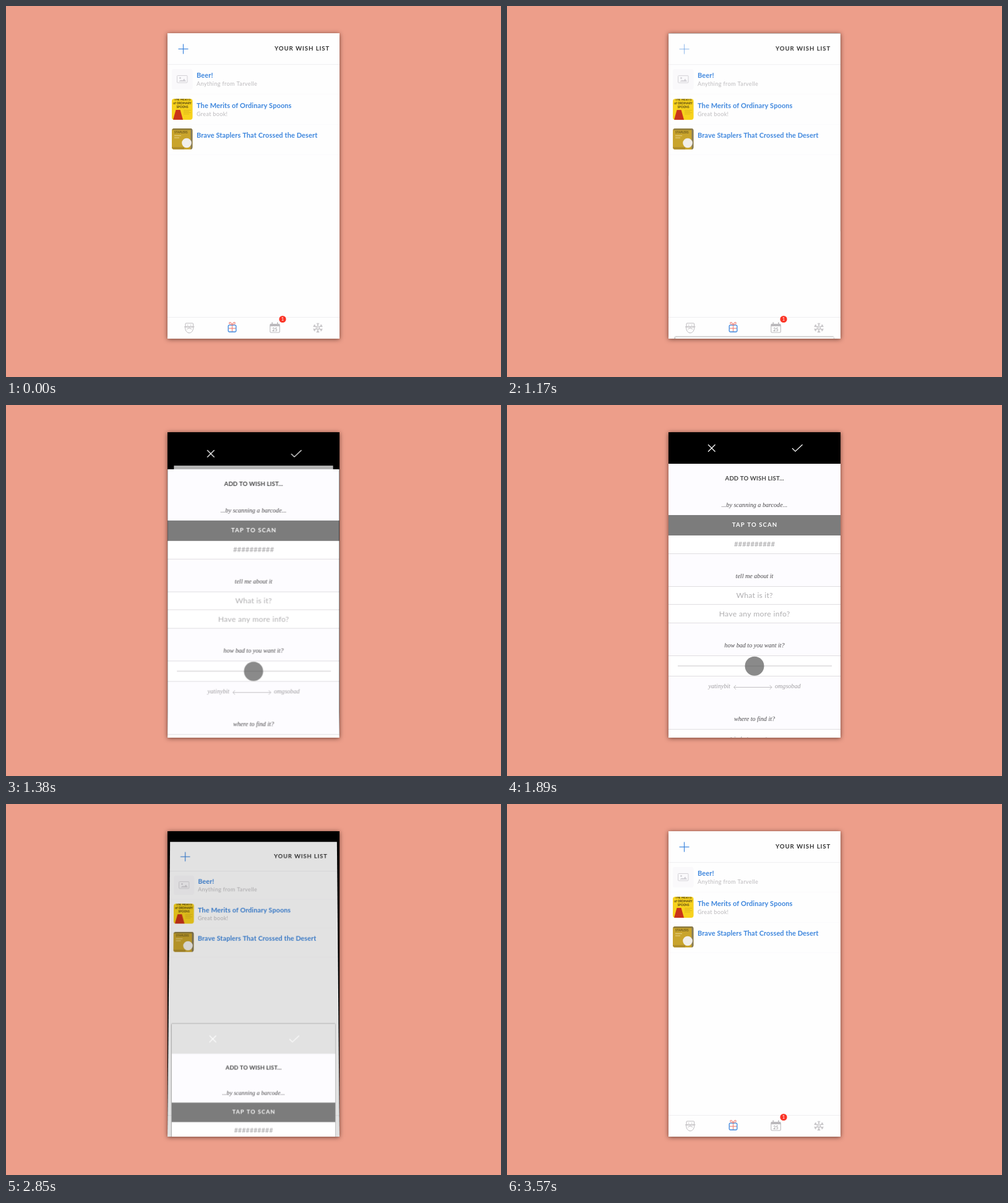
These frames come from a looping animation (800x600 px, 3600 ms). An HTML page with a canvas:

```html
<!DOCTYPE html>
<html lang="en">
<head>
<meta charset="utf-8">
<title>Wish list</title>
<style>
  html, body { margin: 0; width: 800px; height: 600px; overflow: hidden; background: #ed9e8a; }
  #phone {
    position: absolute; left: 261px; top: 44px; width: 278px; height: 494px;
    overflow: hidden; background: #000;
  }
  #shadow {
    position: absolute; left: 261px; top: 44px; width: 278px; height: 494px;
    box-shadow: 0 1px 7px rgba(40, 15, 10, .65);
  }
  canvas { position: absolute; left: 0; top: 0; }
  #list { transform-origin: 50% 100%; }
  #sheet { transform-origin: 50% 0; }
</style>
</head>
<body>
<div id="shadow"></div>
<div id="phone">
  <canvas id="list" width="278" height="494"></canvas>
  <canvas id="sheet" width="278" height="494"></canvas>
</div>
<script>
const LOOP = 3600, TAP = 1140, OPEN = 1167, CLOSE = 2758;
const SANS = 'Lato, sans-serif';
const ITALIC = 'italic 10.1px "Liberation Serif", serif';
const BLUE = '#3d86dd', GREY = '#bcbabd';

const listEl = document.getElementById('list');
const sheetEl = document.getElementById('sheet');
let c;

// Both canvases are drawn in stage coordinates.
function begin(canvas) {
  c = canvas.getContext('2d');
  c.setTransform(1, 0, 0, 1, 0, 0);
  c.clearRect(0, 0, canvas.width, canvas.height);
  c.translate(-261, -44);
}

function rect(x, y, w, h, fill) {
  c.fillStyle = fill;
  c.fillRect(x, y, w, h);
}

function text(str, x, y, font, color, align = 'left', spacing = 0) {
  c.font = font;
  c.fillStyle = color;
  c.textAlign = align;
  c.letterSpacing = spacing + 'px';
  c.fillText(str, align === 'center' ? x + spacing / 2 : x, y);
}

function line(color, width, ...points) {
  c.strokeStyle = color;
  c.lineWidth = width;
  c.beginPath();
  for (let i = 0; i < points.length; i += 2) c.lineTo(points[i], points[i + 1]);
  c.stroke();
}

function disc(x, y, r, fill) {
  c.fillStyle = fill;
  c.beginPath();
  c.arc(x, y, r, 0, Math.PI * 2);
  c.fill();
}

function rounded(x, y, w, h, r) {
  c.beginPath();
  c.roundRect(x, y, w, h, r);
}

function outline(x, y, w, h, r, color, width = 1) {
  rounded(x, y, w, h, r);
  c.strokeStyle = color;
  c.lineWidth = width;
  c.stroke();
}

function thumb(y, fill, paint) {
  c.save();
  rounded(268, y, 33.5, 34, 4);
  c.clip();
  rect(268, y, 34, 34, fill);
  paint();
  c.restore();
}

function placeholderImage() {
  outline(276.5, 112.5, 16.5, 11.5, 1, '#d3d1d6');
  disc(281.5, 116.5, 1.4, '#d3d1d6');
  c.beginPath();
  c.moveTo(279, 122);
  c.lineTo(283, 119.5);
  c.lineTo(285, 120.5);
  c.lineTo(288, 117.5);
  c.lineTo(291, 122);
  c.fill();
}

function spoonCover() {
  const ink = '#4a3a10', font = 'bold 4.6px ' + SANS;
  text('THE MERITS', 285, 152.5, font, ink, 'center');
  text('of ORDINARY', 285, 158.5, font, ink, 'center');
  text('SPOONS', 285, 164.5, font, ink, 'center');
  c.fillStyle = '#c9331a';
  c.beginPath();
  c.moveTo(274.5, 168);
  c.lineTo(281.5, 168);
  c.lineTo(286, 184);
  c.lineTo(270, 184);
  c.fill();
  for (let i = 0; i < 4; i++) rect(287, 168 + i * 2.2, 12 - i % 2 * 3, .6, '#d3a91b');
}

function staplerCover() {
  rect(268, 198, 34, 2.5, '#8c7a3f');
  rect(298.5, 198, 3, 34, '#847a5c');
  text('STAPLERS', 272, 205.5, 'bold 4.6px ' + SANS, '#6b571b');
  rect(272, 209, 11, 1.2, '#e3cb7c');
  rect(272, 212.5, 8, 1.2, '#e3cb7c');
  rect(268, 228, 20, 4, '#b18f2b');
  disc(292, 221.5, 7.8, '#f1eeea');
}

function faceIcon() {
  outline(290, 513, 12.5, 6, 1, GREY);
  line(GREY, 1, 288, 518.8, 304.5, 518.8);
  c.beginPath();
  c.moveTo(289.5, 519);
  c.bezierCurveTo(289.5, 532, 302.8, 532, 302.8, 519);
  c.stroke();
  disc(293.7, 516.3, .8, GREY);
  disc(298.7, 516.3, .8, GREY);
  line(GREY, 1, 292.5, 522.5, 296.2, 520.8, 300, 522.5);
}

function giftIcon() {
  const red = '#ee8077';
  line(red, 1.1, 365.5, 516, 365.5, 527);
  line(red, 1.1, 360, 521.3, 371, 521.3);
  outline(359.2, 516.2, 12.6, 10.8, 1.5, BLUE, 1.3);
  c.strokeStyle = red;
  c.lineWidth = 1.1;
  for (const side of [-1, 1]) {
    c.beginPath();
    c.moveTo(365.5, 515.5);
    c.quadraticCurveTo(365.5 + side * 2, 510.5, 365.5 + side * 4.5, 512);
    c.quadraticCurveTo(365.5 + side * 6, 514.5, 365.5, 515.5);
    c.stroke();
  }
}

function calendarIcon() {
  outline(426.8, 514.5, 15.5, 13.5, 1.5, GREY, 1.1);
  rect(427, 514, 15, 4, GREY);
  rect(429.4, 511.5, 1.6, 4, GREY);
  rect(438, 511.5, 1.6, 4, GREY);
  text('25', 434.5, 525.5, 'bold 7px ' + SANS, '#a9a7aa', 'center', .2);
  disc(447, 506.5, 5.6, '#fb3426');
  text('1', 447, 509.2, '7.5px ' + SANS, '#fff', 'center');
}

function snowflakeIcon() {
  c.save();
  c.translate(504, 520.5);
  for (let i = 0; i < 6; i++) {
    line(GREY, 1.1, 0, -3, 0, -8);
    line(GREY, 1, -2.2, -7.4, 0, -5.3, 2.2, -7.4);
    line(GREY, 1, 0, -3, 2.6, -1.5);
    c.rotate(Math.PI / 3);
  }
  disc(0, 0, 1, GREY);
  c.restore();
}

function drawList(plusAlpha) {
  begin(listEl);
  rect(261, 44, 278, 494, '#fefefe');
  c.globalAlpha = plusAlpha;
  line(BLUE, 1.2, 278.5, 69.5, 294.5, 69.5);
  line(BLUE, 1.2, 286.5, 61.5, 286.5, 77.5);
  c.globalAlpha = 1;
  text('YOUR WISH LIST', 434, 72.3, 'bold 9.7px ' + SANS, '#333', 'left', .9);
  rect(261, 94, 278, 1, '#f0eff1');
  for (const y of [142, 191, 240]) rect(261, y, 278, 1, '#fbfafc');

  thumb(101.5, '#faf9fb', placeholderImage);
  thumb(150, '#f7d21d', spoonCover);
  thumb(198, '#c9a42c', staplerCover);

  const title = 'bold 11px ' + SANS, note = '9.1px ' + SANS;
  text('Beer!', 308, 116.3, title, BLUE, 'left', .1);
  text('Anything from Tarvelle', 308, 129, note, '#bbb9bc', 'left', .35);
  text('The Merits of Ordinary Spoons', 308, 165, title, BLUE, 'left', .1);
  text('Great book!', 308, 177.6, note, '#bbb9bc', 'left', .3);
  text('Brave Staplers That Crossed the Desert', 308, 213.4, title, BLUE, 'left', .1);

  rect(261, 503, 278, 1, '#efeef0');
  faceIcon();
  giftIcon();
  calendarIcon();
  snowflakeIcon();
}

function field(top, bottom) {
  rect(261, top, 278, bottom - top, '#fff');
  rect(261, top, 278, 1, '#e0dee1');
  rect(261, bottom, 278, 1, '#e0dee1');
}

function drawSheet() {
  begin(sheetEl);
  line('#fff', 1.2, 325, 64, 336.5, 75.5);
  line('#fff', 1.2, 336.5, 64, 325, 75.5);
  line('#fff', 1.2, 461, 70, 466, 75, 477.5, 64);
  rect(261, 95, 278, 443, '#fdfcff');

  text('ADD TO WISH LIST...', 400, 122.4, 'bold 9.6px ' + SANS, '#444', 'center', .15);
  field(210, 240);
  rect(261, 178, 278, 33, '#7c7c7c');
  text('TAP TO SCAN', 400, 197.4, 'bold 9.6px ' + SANS, '#fff', 'center', 1.1);
  field(293, 322);
  field(322, 352);
  field(405, 438);
  field(524, 560);

  const captions = [['...by scanning a barcode...', 164.5], ['tell me about it', 280],
    ['how bad to you want it?', 391.5], ['where to find it?', 511]];
  for (const [str, y] of captions) text(str, 400, y, ITALIC, '#4c4b4d', 'center');

  text('##########', 400, 229, '11.4px ' + SANS, '#a3a2a4', 'center');
  const hint = '12.2px ' + SANS;
  text('What is it?', 400, 312.2, hint, '#b0afb1', 'center', .2);
  text('Have any more info?', 400, 341.6, hint, '#b0afb1', 'center', .3);
  text('Link to a store', 400, 544.5, hint, '#b0afb1', 'center', .2);

  rect(276, 421, 249, 2, '#e4e2e4');
  disc(400, 422.3, 15.5, '#8a8a8a');
  rect(385, 421.5, 30, 1.5, '#7f7f7f');

  text('yatinybit', 325.5, 458.3, ITALIC, '#a19fa2');
  text('omgsobad', 433, 458.3, ITALIC, '#a19fa2');
  line('#c2c0c3', 1, 367, 456.5, 428, 456.5);
  line('#c2c0c3', 1, 370, 453, 366.5, 456.5, 370, 460);
  line('#c2c0c3', 1, 424.5, 453, 428, 456.5, 424.5, 460);
}

// Critically damped spring from 0 to 1.
function spring(time, rate) {
  const k = Math.max(0, time) * rate;
  return 1 - (1 + k) * Math.exp(-k);
}

function openness(t) {
  return t < CLOSE ? spring(t - OPEN, .0278) : 1 - spring(t - CLOSE, .023);
}

function render(t) {
  const p = openness(t), rest = 1 - p, moving = p > .001;
  drawList(t >= TAP && t < TAP + 60 ? .5 : 1);
  listEl.style.transform = moving ? `perspective(1650px) rotateX(${16 * p}deg)` : 'none';
  listEl.style.filter = moving ? `brightness(${1 - .3 * p})` : 'none';
  sheetEl.style.visibility = moving ? 'visible' : 'hidden';
  sheetEl.style.transform = rest < .0008 ? 'none' : `translateY(${494 * rest}px) scale(${1 - .077 * rest})`;
  sheetEl.style.boxShadow = `0 0 2px rgba(0, 0, 0, ${rest})`;
}

drawSheet();
const start = performance.now();
function tick() {
  render((performance.now() - start) % LOOP);
  requestAnimationFrame(tick);
}
tick();
</script>
</body>
</html>
```
